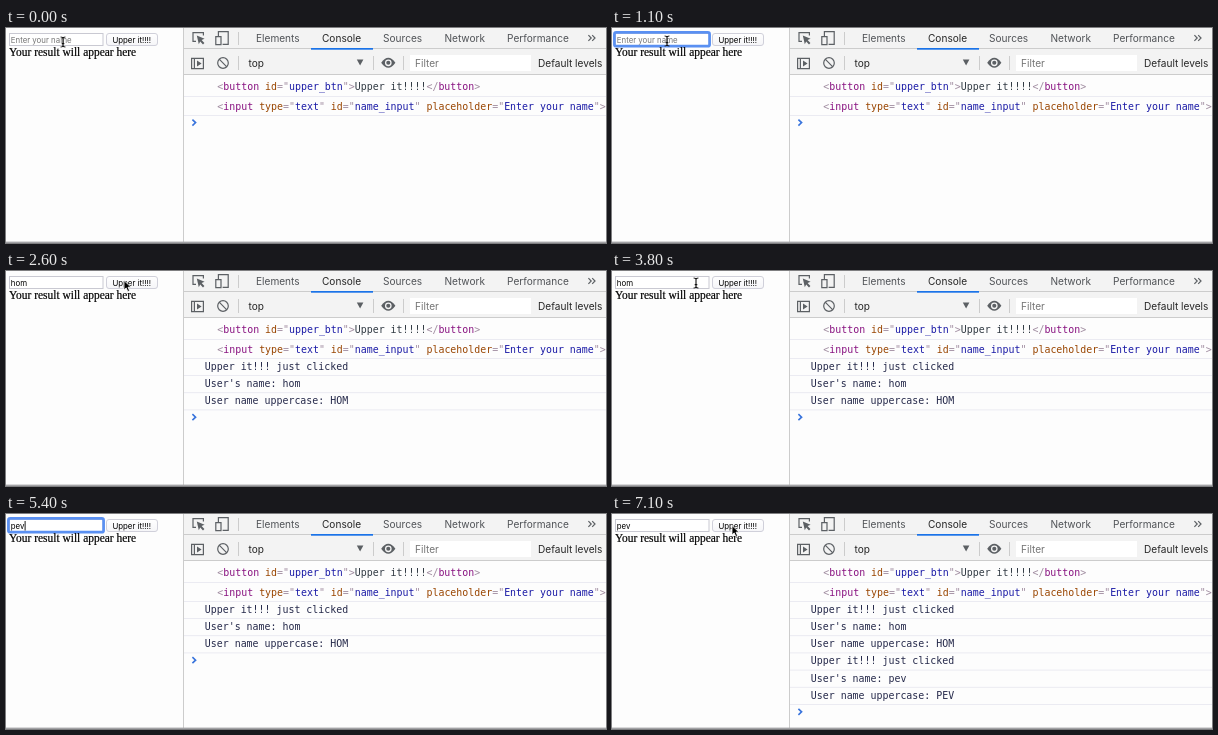
Write an HTML page that moves like this. It is 600 by 215 pixels and loops after 7200 ms.

```html
<!DOCTYPE html>
<html lang="en">
<head>
<meta charset="utf-8">
<title>Upper it</title>
<style>
  html, body { margin: 0; width: 100%; height: 100%; overflow: hidden; background: #fdfdfd; }
  svg { display: block; width: 600px; height: 215px; }
  text { white-space: pre; }
  .page { font: 11.45px "Liberation Serif", serif; stroke: #000; stroke-width: .2; }
  .form { font: 7.85px Inter, sans-serif; }
  .ui { font: 10.1px Inter, sans-serif; fill: #505357; }
  .on { fill: #262626; }
  .dim { fill: #757575; }
  .code { font: 9.94px "DejaVu Sans Mono", monospace; fill: #a08ca0; }
  .tag { fill: #881280; }
  .attr { fill: #994500; }
  .val { fill: #1a1aa6; }
  .plain { fill: #303942; }
  .log { fill: #25294a; }
  .rule { stroke: #ebebf2; }
  .bar { stroke: #ccc; }
  .icon { fill: none; stroke: #5c6064; stroke-width: 1.2; }
  .solid { fill: #5c6064; }
</style>
</head>
<body>
<svg viewBox="0 0 600 215">
  <defs>
    <linearGradient id="face" x2="0" y2="1">
      <stop stop-color="#fff"/><stop offset="1" stop-color="#f5f5f8"/>
    </linearGradient>
  </defs>
  <rect width="600" height="215" fill="#fdfdfd"/>

  <g class="form">
    <rect x="3.5" y="5.5" width="93.5" height="12" fill="#fff" stroke="#c9c9d2"/>
    <rect id="ring" x="2.4" y="4.4" width="95.2" height="13.8" rx="1.8" fill="none" stroke="#5a90f2" stroke-width="2.7"/>
    <rect id="mark" x="5" y="7" width="16" height="9.5" fill="#b3d7fe"/>
    <text id="hint" class="dim" x="4.8" y="14.9">Enter your name</text>
    <text id="field" x="4.8" y="14.9"></text>
    <rect id="caret" y="7" width=".9" height="9.5"/>
    <rect x="100.5" y="5.5" width="51" height="12" rx="2.5" fill="url(#face)" stroke="#d0d0da"/>
    <text x="106.4" y="14.9">Upper it!!!!</text>
  </g>
  <text class="page" x="3" y="28">Your result will appear here</text>

  <rect x="178" width="422" height="47" fill="#f3f3f3"/>
  <path class="bar" d="M177.5 0V214M178 20.5H600M178 46.5H600M232.5 4V17M232.5 28V42M367.5 28V42M397.5 28V42"/>
  <rect x="305" y="20" width="62" height="1.7" fill="#1a73e8"/>
  <rect x="404" y="27" width="121" height="16" fill="#fff"/>

  <path class="icon" d="M190 13.4H187V4.6H197.4V7.5M212.4 8V3.6H222.2V16.4H216.6M209.8 8.6H215V16.6H209.8Z"/>
  <path class="solid" d="M190.8 7.6L198.6 10.8L195.6 12L198.4 15L197 16.4L194.2 13.5L192.8 16.2Z"/>
  <path class="icon" d="M185.6 30.4H197.4V40.6H185.6ZM188.4 30.4V40.6M213.2 31.2L220.8 38.8"/>
  <circle class="icon" cx="217" cy="35" r="5.3"/>
  <path class="solid" d="M191 32.6L195.6 35.5L191 38.4ZM350.8 31.4H357.4L354.1 37.6Z"/>
  <path class="solid" d="M375.2 34.8Q382.3 24.8 389.4 34.8Q382.3 44.8 375.2 34.8Z"/>
  <circle cx="382.3" cy="34.8" r="2.7" fill="#5c6064" stroke="#f3f3f3" stroke-width="1.3"/>

  <g class="ui">
    <text x="250" y="13.6">Elements</text>
    <text class="on" x="316" y="13.6">Console</text>
    <text x="377" y="13.6">Sources</text>
    <text x="438.4" y="13.6">Network</text>
    <text x="501" y="13.6">Performance</text>
    <path class="icon" d="M582.4 7.2L585.2 10L582.4 12.8M586.2 7.2L589 10L586.2 12.8"/>
    <text class="on" x="242.5" y="38.6">top</text>
    <text class="dim" x="409" y="38.6">Filter</text>
    <text class="on" x="532" y="38.6">Default levels</text>
  </g>

  <path class="rule" d="M178 68.5H600M178 87.5H600"/>
  <g class="code">
    <text x="211.3" y="62.3">&lt;<tspan class="tag">button</tspan> <tspan class="attr">id</tspan>="<tspan class="val">upper_btn</tspan>"&gt;<tspan class="plain">Upper it!!!!</tspan>&lt;/<tspan class="tag">button</tspan>&gt;</text>
    <text x="211.3" y="81.6">&lt;<tspan class="tag">input</tspan> <tspan class="attr">type</tspan>="<tspan class="val">text</tspan>" <tspan class="attr">id</tspan>="<tspan class="val">name_input</tspan>" <tspan class="attr">placeholder</tspan>="<tspan class="val">Enter your name</tspan>"&gt;</text>
    <g id="logs"></g>
  </g>
  <path id="prompt" d="M186.4 -3L189.6 0L186.4 3" fill="none" stroke="#3873dc" stroke-width="1.6"/>
  <rect y="213.6" width="600" height="1.4" fill="#a3a3a6"/>

  <path id="beam" d="M-2.4 -5Q0 -5 0 -3.6Q0 -5 2.4 -5M0 -4V4M-2.4 5Q0 5 0 3.6Q0 5 2.4 5M-1.3 1.6H1.3" fill="none" stroke="#111" stroke-width="1.1"/>
  <path id="arrow" d="M0 0V9.4L2.2 7.4L3.8 11L5.6 10.2L4 6.7H7Z" fill="#000" stroke="#fff" stroke-width=".8"/>
</svg>
<script>
  const LOOP = 7200, STEP = 100, ROW = 17.2;
  const first = 'hom', second = 'pev';
  const el = id => document.getElementById(id);
  const [ring, mark, hint, field, caret, logs, prompt, beam, arrow] =
    ['ring', 'mark', 'hint', 'field', 'caret', 'logs', 'prompt', 'beam', 'arrow'].map(el);

  const within = (t, a, b) => t >= a && t < b;
  const show = (node, on) => node.setAttribute('visibility', on ? 'visible' : 'hidden');
  const place = (node, x, y) => node.setAttribute('transform', `translate(${x} ${y})`);

  const lines = [first, second].flatMap(name => [
    'Upper it!!! just clicked',
    `User's name: ${name}`,
    `User name uppercase: ${name.toUpperCase()}`
  ]);
  logs.innerHTML = lines.map((line, i) => `<g transform="translate(0 ${i * ROW})">
    <text class="log" x="198.8" y="98.8">${line}</text>
    <path class="rule" d="M178 104.5H600"/></g>`).join('');

  // time, x, y
  const route = [
    [0, 57, 14], [300, 57, 14], [600, 55, 13], [1900, 55, 13],
    [2300, 118, 9.5], [3100, 118, 9.5], [3700, 84, 12], [3800, 84, 12],
    [4000, 71, 12], [4400, 12, 12], [5700, 12, 12],
    [6400, 120, 11.5], [LOOP, 120, 11.5]
  ];

  function pointer(t) {
    const i = route.findIndex(p => p[0] > t);
    const [t0, x0, y0] = route[i - 1], [t1, x1, y1] = route[i];
    const u = (t - t0) / (t1 - t0), k = u * u * (3 - 2 * u);
    return [x0 + (x1 - x0) * k, y0 + (y1 - y0) * k];
  }

  const typed = (word, t, start, gap) =>
    word.slice(0, Math.max(0, Math.floor((t - start) / gap) + 1));

  function draw(now) {
    const t = Math.floor(now % LOOP / STEP) * STEP;
    const focused = within(t, 600, 2500) || within(t, 4400, 6900);
    const selected = within(t, 4500, 4800);
    const value = t < 4800 ? typed(first, t, 1300, 200) : typed(second, t, 4800, 200);
    field.textContent = value;
    show(hint, !value);
    show(ring, focused);
    show(mark, selected);

    // Each keystroke restarts the blink.
    const since = [600, 1300, 1500, 1700, 4400, 4800, 5000, 5200].filter(k => k <= t).pop();
    show(caret, focused && !selected && (t - since) % 1000 < 500);
    caret.setAttribute('x', value ? 5 + field.getComputedTextLength() : 4.8);

    const count = t >= 7000 ? 6 : t >= 2500 ? 3 : 0;
    [...logs.children].forEach((row, i) => show(row, i < count));
    place(prompt, 0, 94.6 + count * ROW);

    const [x, y] = pointer(t);
    const seen = !within(t, 1300, 1900) && !within(t, 4800, 5700);
    place(beam, x, y);
    place(arrow, x, y);
    show(beam, seen && x < 98);
    show(arrow, seen && x >= 98);
    requestAnimationFrame(draw);
  }
  requestAnimationFrame(draw);
</script>
</body>
</html>
```
